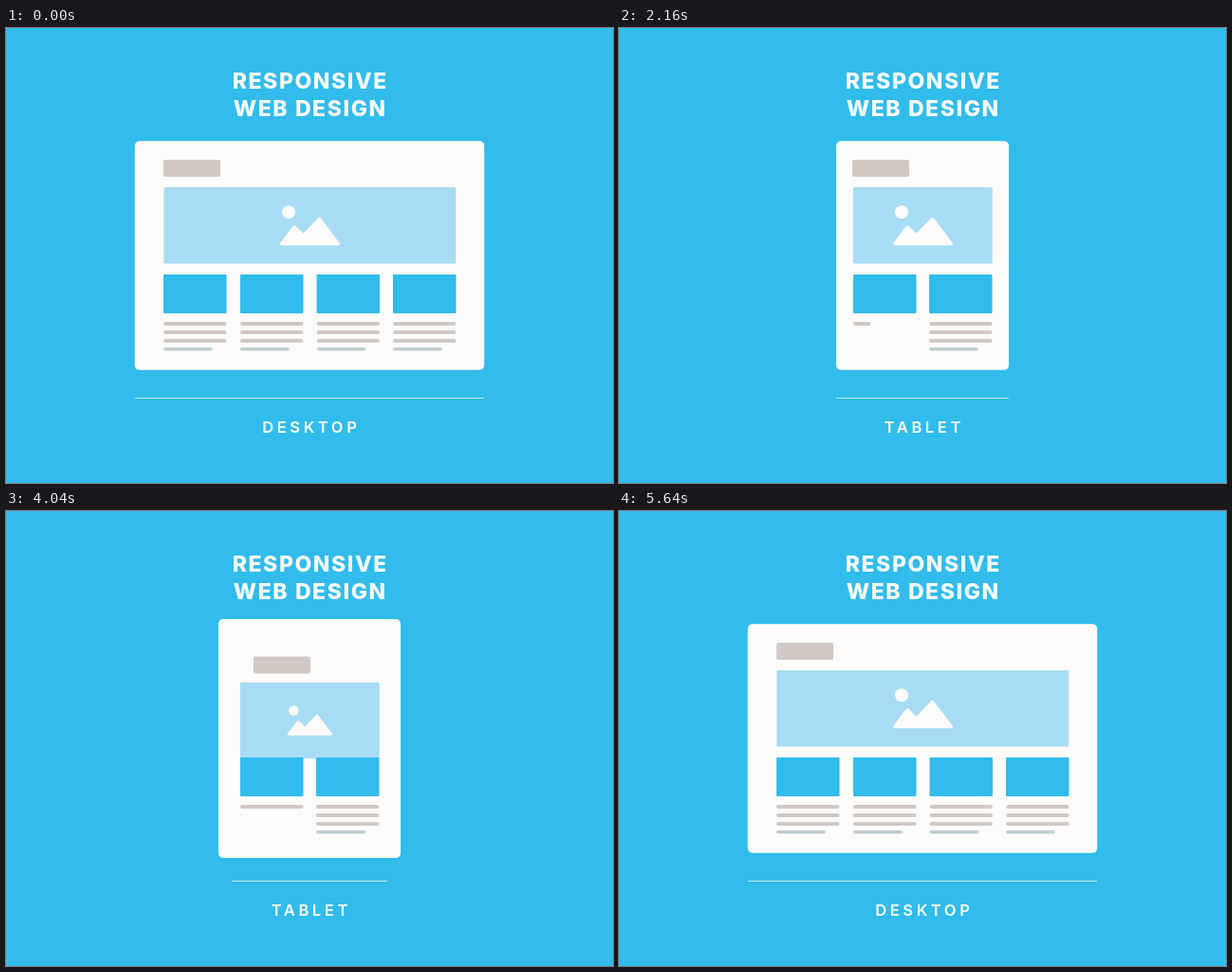
An HTML page with a canvas for the animation above (5.72 s loop, 640 px wide and 480 px high).

```html
<!DOCTYPE html>
<html lang="en">
<head>
<meta charset="utf-8">
<title>Responsive web design</title>
<style>
  html, body { margin: 0; width: 100%; height: 100%; overflow: hidden; background: #31bcec; }
  canvas { display: block; }
</style>
</head>
<body>
<canvas id="stage" width="640" height="480"></canvas>
<script>
const ctx = document.getElementById('stage').getContext('2d');
const LOOP = 5720;
const BLUE = '#31bcec', WHITE = '#fdfcfa', SKY = '#a8dcf5', GREY = '#d2c8c4', PALE = '#bccfd3';

const clamp = v => Math.max(0, Math.min(1, v));
const sine = p => (1 - Math.cos(Math.PI * p)) / 2;
const back = p => 1 + 2.7 * (p - 1) ** 3 + 1.7 * (p - 1) ** 2;

// Layouts visited in order: desktop, tablet, mobile, tablet, desktop.
const ROUTE = [0, 1, 2, 1, 0];

// values: one per layout; starts: when each of the four changes begins.
function tween(t, values, starts, dur = 200, ease = sine) {
  let v = values[0];
  starts.forEach((start, i) => {
    if (t >= start) v += (values[ROUTE[i + 1]] - values[ROUTE[i]]) * ease(clamp((t - start) / dur));
  });
  return v;
}

function box(x, y, w, h, r, color) {
  if (w < 0.2) return;
  ctx.fillStyle = color;
  ctx.beginPath();
  ctx.roundRect(x, y, w, h, r);
  ctx.fill();
}

function text(str, y, size, weight, spacing) {
  ctx.font = `${weight} ${size}px Inter, "Open Sans", sans-serif`;
  ctx.letterSpacing = spacing + 'px';
  ctx.textAlign = 'center';
  ctx.fillStyle = WHITE;
  ctx.fillText(str, 320 + spacing / 2, y);
}

function picture(cy, scale) {
  ctx.save();
  ctx.translate(320, cy);
  ctx.scale(scale, scale);
  ctx.fillStyle = ctx.strokeStyle = WHITE;
  ctx.lineWidth = 3;
  ctx.lineJoin = 'round';
  ctx.beginPath();
  ctx.arc(-22, -14, 7, 0, 7);
  ctx.fill();
  ctx.beginPath();
  [[-29.5, 19.5], [-16, 1.5], [-6.5, 10.5], [10.5, -7], [30.5, 19.5]].forEach(p => ctx.lineTo(...p));
  ctx.closePath();
  ctx.fill();
  ctx.stroke();
  ctx.restore();
}

// lines: how many text lines are written, fractions included.
function card(x, y, w, lines) {
  box(x, y, w, 41, 1, BLUE);
  for (let i = 0; i < 4; i++) {
    const last = i === 3;
    box(x, 310 + 9 * i, w * (last ? 0.78 : 1) * clamp(lines - i), last ? 3.5 : 4, 2, last ? PALE : GREY);
  }
}

const CARDS = [
  { x: [166, 247, 290], w: [66.5, 66.5, 60], starts: [1080, 2480, 3680, 5080] },
  { x: [247, 327, 339], w: [66.5, 66.5, 0], starts: [1205, 2480, 3760, 5160] },
  { x: [327.5, 339.5, 339.5], w: [66.5, 0, 0], starts: [880, 9e3, 9e3, 5280] },
  { x: [408, 420, 420], w: [66.5, 0, 0], starts: [840, 9e3, 9e3, 5360] }
];

function firstCardLines(t) {
  return t < 3720 ? 4 * (1 - clamp((t - 1640) / 560)) : 4 * clamp((t - 3720) / 1280);
}

function label(t) {
  if (t < 1080 || t >= 5320) return 'DESKTOP';
  return t >= 2440 && t < 3920 ? 'MOBILE' : 'TABLET';
}

function draw(t) {
  box(0, 0, 640, 480, 0, BLUE);
  text('RESPONSIVE', 64, 23, 800, 1.6);
  text('WEB DESIGN', 92.5, 23, 800, 1.6);

  const shell = [840, 2200, 3760, 5120];
  const bodyW = tween(t, [368.5, 182, 80], shell, 480, back);
  const bodyH = tween(t, [241.5, 241.5, 135.5], shell, 480, back);
  box(320 - bodyW / 2, 240 - bodyH / 2, bodyW, bodyH, 5, WHITE);

  const head = [960, 2280, 3920, 5440];
  box(tween(t, [166, 246, 290], head), tween(t, [139, 139, 182], head), 60, 18, 2, GREY);

  const size = [1040, 2440, 3740, 5320], place = [1040, 2240, 3960, 5320];
  const imgW = tween(t, [308, 147, 60], size), imgH = tween(t, [80.5, 80.5, 41.5], size);
  const cy = tween(t, [208.2, 208.2, 228], place);
  box(320.3 - imgW / 2, cy - imgH / 2, imgW, imgH, 1.5, SKY);
  picture(cy, tween(t, [1, 1, 0.62], place));

  CARDS.forEach((c, i) => card(
    tween(t, c.x, c.starts),
    tween(t, [260, 260, 255.5], c.starts),
    tween(t, c.w, c.starts),
    i ? 4 : firstCardLines(t)
  ));

  const rule = tween(t, [368, 182, 81], [840, 2250, 3780, 5080], 360);
  box(320 - rule / 2, 390, rule, 1, 0, '#c4e8f6');
  text(label(t), 427, 16.5, 600, 3.6);
}

const begin = performance.now();
function tick() {
  draw((performance.now() - begin) % LOOP);
  requestAnimationFrame(tick);
}
tick();
</script>
</body>
</html>
```
